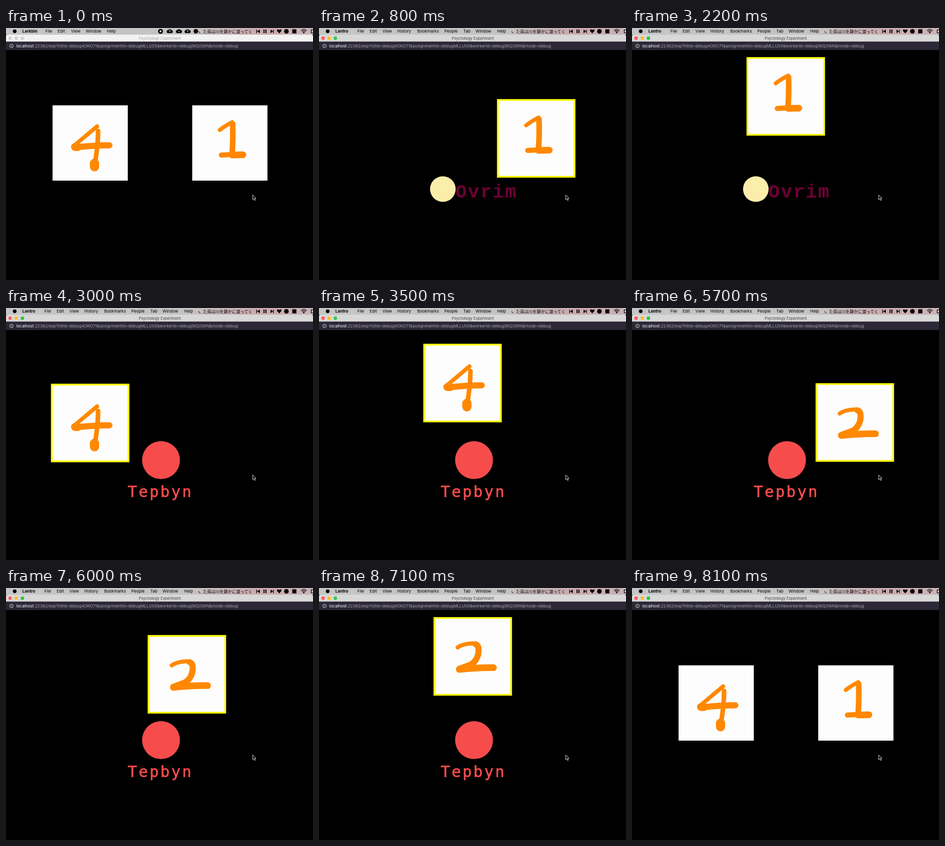
Animation of 600 by 492 pixels, one loop 8200 ms. Source, as an HTML page:

```html
<!DOCTYPE html>
<html lang="en">
<head>
<meta charset="utf-8">
<title>Psychology Experiment</title>
<style>
html, body { margin: 0; width: 100%; height: 100%; overflow: hidden; background: #000; }
svg { display: block; width: 600px; height: 492px; }
text { font: 8px Inter, sans-serif; white-space: pre; }
.app { font-weight: 700; }
.round { fill: none; stroke: #ff8800; stroke-linecap: round; stroke-linejoin: round; }
.lyric { font: 8.1px "Noto Sans CJK JP", "Noto Sans CJK", sans-serif; }
#axis text { font: 700 36px "Liberation Mono", monospace; letter-spacing: 2.6px; }
#hex text { font: 30px "DejaVu Sans Mono", monospace; letter-spacing: 3.2px; }
</style>
</head>
<body>
<svg viewBox="0 0 600 492">
  <defs>
    <linearGradient id="bar">
      <stop offset="0" stop-color="#c6c6c6"/><stop offset=".6" stop-color="#c4c2c2"/>
      <stop offset=".83" stop-color="#cba9ae"/><stop offset="1" stop-color="#c8b4b7"/>
    </linearGradient>
    <g id="d1" class="round">
      <path stroke-width="8" d="M54 48Q64 40 78 33"/>
      <path stroke-width="11" d="M79 36Q80 66 78 94"/>
      <path stroke-width="10" d="M57 97L78 96"/>
      <path stroke-width="13" d="M78 97L99 96.5"/>
    </g>
    <g id="d2" class="round">
      <path stroke-width="8" d="M44 56Q55 48 79 48"/>
      <path stroke-width="12" d="M79 50Q87 52 84 70Q80 84 69 90L47 98"/>
      <path stroke-width="13" d="M47 99Q80 95 114 95.5"/>
    </g>
    <g id="d4" class="round">
      <path stroke-width="8" d="M87 41L43 78"/>
      <path stroke-width="14" d="M43 81Q44 83 50 82"/>
      <path stroke-width="12" d="M46 82Q80 78 111 78"/>
      <path stroke-width="9" d="M89 50Q89 76 83 112"/>
      <path stroke-width="18" d="M82 113L82 120"/>
    </g>
    <path id="cloud" d="M-3-2A3.4 3.4 0 0 1 3-2A2.8 2.8 0 0 1 3 4H-3A2.9 2.9 0 0 1-3-2Z"/>
  </defs>

  <rect width="600" height="492"/>
  <rect width="600" height="13" fill="url(#bar)"/>
  <circle cx="17" cy="6.3" r="3.6"/>
  <g id="menuIdle"></g>
  <g id="menuLive"></g>

  <g id="trayIdle">
    <circle cx="302" cy="6.5" r="4.8"/>
    <rect x="300.3" y="4.8" width="3.4" height="3.4" fill="#ddd"/>
    <use href="#cloud" x="320" y="6"/><use href="#cloud" x="338" y="6"/><use href="#cloud" x="355" y="6"/>
    <path d="M320 8.5V4.5M318.5 6L320 4.5L321.5 6M336 7H340M355 8.5V4.5M353.5 6L355 4.5L356.5 6" fill="none" stroke="#ddd"/>
    <circle cx="371" cy="6.3" r="4.4"/>
  </g>
  <path d="M377 6V8Q377.5 10 380 9.7" fill="none" stroke="#000" stroke-width=".9"/>
  <text class="lyric" x="385" y="9.5">た鳥は川を静かに渡ってく</text>
  <path d="M489 3h1.3v7H489ZM496 3v7L490.5 6.5ZM503.3 3h2v7h-2ZM507 3h2v7h-2ZM517 3v7L522 6.5ZM522 3h1.3v7H522Z"/>
  <path d="M534 10.5L529.8 6Q528.8 3 531.3 2.4Q533 2.4 534 4Q535 2.4 536.7 2.4Q539.2 3 538.2 6Z"/>
  <circle cx="548" cy="6.5" r="4.5"/>
  <rect x="559.5" y="2.5" width="8" height="8"/>
  <g fill="none" stroke="#000" stroke-width="1.2">
    <path d="M576.6 5.2Q582 0 587.4 5.2M578.5 7Q582 3.7 585.5 7M580.3 8.8Q582 7.2 583.7 8.8"/>
    <path d="M600 3.5H596.5V9.5H600"/>
  </g>
  <circle cx="582" cy="9.7" r=".9"/>

  <path id="titleBar" d="M0 27V16Q0 13 3 13H597Q600 13 600 16V27Z"/>
  <g id="lights"><circle cx="8"/><circle cx="20"/><circle cx="32"/></g>
  <text id="title" x="300.5" y="22.7" text-anchor="middle" style="font-size:7.4px">Psychology Experiment</text>
  <rect y="26.5" width="600" height="16.5" fill="#2c2836"/>
  <g fill="none" stroke="#dddbe0" stroke-width=".9">
    <circle cx="10.8" cy="35" r="3.5"/><path d="M10.8 34.5V37M10.8 32.8V33.7"/>
  </g>
  <text x="20" y="37.8" fill="#a6a3ac"><tspan fill="#fff">localhost</tspan>:22362/exp?hitId=debug4OKO71&amp;assignmentId=debugMLLUS5&amp;workerId=debug5KQ3WN&amp;mode=debug</text>

  <g id="axis"><circle cx="242" cy="314.5" r="25" fill="#fbeeaa"/><text x="267" y="331" fill="#6e0035">Ovrim</text></g>
  <g id="hex"><circle cx="303" cy="297" r="37" fill="#f74c4c"/><text x="238" y="369" fill="#f74c4c" stroke="#f74c4c" stroke-width=".7">Tepbyn</text></g>
  <g id="left" class="tile"><rect width="147" height="147" fill="#fdfdfd"/><use/></g>
  <g id="right" class="tile"><rect width="147" height="147" fill="#fdfdfd"/><use/></g>
  <rect id="frame" width="150" height="150" fill="none" stroke="#ff0" stroke-width="3.4"/>
  <path d="M482 326V335L484.2 333.2L485.8 336.6L487.4 335.9L485.9 332.6H488.5Z" stroke="#eee" stroke-width=".9"/>
</svg>
<script>
const LOOP = 8200, STEP = 100, PAUSE = 300, MOVE = 500, HOLD = 1000;
const $ = id => document.getElementById(id);
const home = { left: [91, 151], right: [364, 151] }, goal = [227, 60];

// Each trial: digits on both sides, chosen side, time its tile sets off, logo
const trials = [
  { left: 4, right: 1, pick: 'right', go: 752, logo: 'axis' },
  { left: 4, right: 1, pick: 'left', go: 3072, logo: 'hex' },
  { left: 1, right: 2, pick: 'right', go: 5693, logo: 'hex' },
  { left: 4, right: 1, pick: 'right', go: Infinity }
];

function menu(id, items) {
  items.forEach(([x, label], i) => {
    const el = document.createElementNS('http://www.w3.org/2000/svg', 'text');
    el.setAttribute('x', x);
    el.setAttribute('y', 9.3);
    if (!i) el.setAttribute('class', 'app');
    el.textContent = label;
    $(id).append(el);
  });
}
menu('menuIdle', [[32, 'Larkbin'], [77, 'File'], [101, 'Edit'], [127, 'View'], [156, 'Window'], [197, 'Help']]);
menu('menuLive', [[32, 'Lantro'], [75, 'File'], [99, 'Edit'], [124, 'View'], [153, 'History'], [192, 'Bookmarks'],
  [245, 'People'], [282, 'Tab'], [306, 'Window'], [348, 'Help']]);

const show = (id, on) => $(id).style.display = on ? '' : 'none';
const place = (id, x, y) => $(id).setAttribute('transform', `translate(${x} ${y})`);

function windowState(live) {
  show('menuIdle', !live);
  show('trayIdle', !live);
  show('menuLive', live);
  $('titleBar').style.fill = live ? '#d8d8d8' : '#f2f2f2';
  $('title').style.fill = live ? '#444' : '#a5a5a5';
  const colors = live ? ['#fc5b57', '#fdbc2e', '#28c840'] : ['#d2d2d2', '#d2d2d2', '#d2d2d2'];
  [...$('lights').children].forEach((c, i) => {
    c.setAttribute('cy', 19.8);
    c.setAttribute('r', 3.4);
    c.style.fill = colors[i];
  });
}

function draw(now) {
  const t = Math.floor(now % LOOP / STEP) * STEP;
  windowState(t >= 100);
  const trial = trials.find(r => t < r.go + MOVE + HOLD);
  const chosen = t >= trial.go - PAUSE;
  const k = Math.min(1, Math.max(0, (t - trial.go) / MOVE));
  for (const side of ['left', 'right']) {
    const picked = side === trial.pick;
    const [x, y] = home[side].map((v, i) => picked ? Math.round(v + (goal[i] - v) * k) : v);
    show(side, picked || !chosen);
    place(side, x, y);
    $(side).querySelector('use').setAttribute('href', '#d' + trial[side]);
    if (picked) place('frame', x - 1.5, y - 1.5);
  }
  show('frame', chosen);
  for (const logo of ['axis', 'hex']) show(logo, chosen && logo === trial.logo);
}

let start;
function tick(now) {
  start ??= now;
  draw(now - start);
  requestAnimationFrame(tick);
}
draw(0);
requestAnimationFrame(tick);
</script>
</body>
</html>
```
